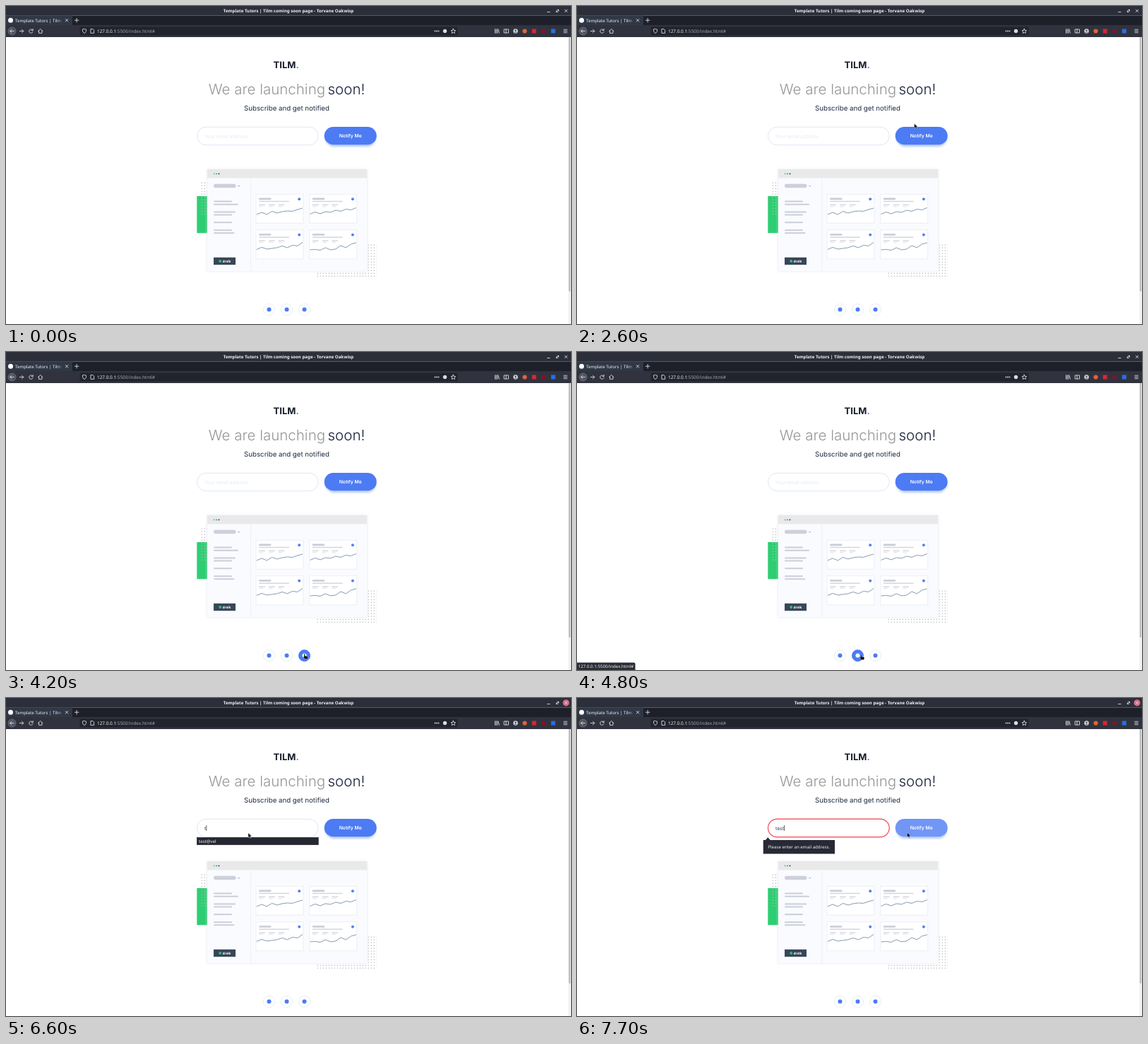
An HTML page for the animation above (8 s loop, 800 px wide and 450 px high).

```html
<!DOCTYPE html>
<html lang="en">
<head>
<meta charset="utf-8">
<title>Coming soon</title>
<style>
html, body { margin: 0; width: 100%; height: 100%; overflow: hidden; background: #fff; }
svg { display: block; width: 800px; height: 450px; }
text { text-rendering: geometricPrecision; white-space: pre; }
.ui { font-family: "Noto Sans", "DejaVu Sans", sans-serif; font-size: 6.14px; fill: #f0f1f4; }
.page { font-family: Inter, "Open Sans", sans-serif; fill: #1d2a41; }
.line { fill: none; stroke: #d9dbe0; stroke-width: .9; stroke-linecap: round; stroke-linejoin: round; }
</style>
</head>
<body>
<svg id="stage" viewBox="0 0 800 450" xmlns="http://www.w3.org/2000/svg">
  <defs>
    <filter id="glow" x="-20%" y="-40%" width="140%" height="200%"><feGaussianBlur stdDeviation="1.5"/></filter>
    <linearGradient id="fade" x1="72" x2="82" gradientUnits="userSpaceOnUse">
      <stop stop-color="#303846" stop-opacity="0"/><stop offset="1" stop-color="#303846"/>
    </linearGradient>
    <pattern id="dots" width="4" height="4" patternUnits="userSpaceOnUse">
      <circle cx="1.3" cy="2.2" r=".75" fill="#b9b9b9"/>
    </pattern>
  </defs>
  <rect width="800" height="450" fill="#fff"/>

  <g id="chrome">
    <rect width="800" height="13.5" fill="#2c2f3a"/>
    <rect y="13.5" width="800" height="13.5" fill="#1d1f29"/>
    <rect y="13.5" width="94" height="13.5" fill="#303846"/>
    <rect y="27" width="800" height="17" fill="#30333e"/>
    <rect x="104.500" y="29.500" width="535" height="12" rx="1.500" fill="#22242d"/>
    <text class="ui" x="400" y="8.800" text-anchor="middle" font-weight="700">Template Tutors | Tilm coming soon page - Torvane Oakwisp</text>
    <circle cx="6.500" cy="20.200" r="3.500" fill="#fff"/>
    <text class="ui" x="13" y="22.500">Template Tutors | Tilm</text>
    <rect x="72" y="15" width="11" height="11" fill="url(#fade)"/>
    <circle id="close" cx="793" cy="6.800" r="4.600" fill="#d96c83"/>
    <path class="line" d="M84.300 18.500l3.500 3.500m0-3.500l-3.500 3.500M97.300 20.200h5.600m-2.800-2.800v5.600M766.500 8.500h3.500M779.300 8.500l3.200-3.200m-1.800 0h1.800v1.800m-3.200-.4v1.800h1.800M791.300 5.100l3.400 3.400m0-3.400l-3.400 3.400"/>
    <circle cx="8.500" cy="35.500" r="5.500" fill="#50545f" stroke="#858993" stroke-width=".6"/>
    <path class="line" d="M11.200 35.500h-5.400m2.300-2.400l-2.400 2.400l2.400 2.400M19.300 35.500h5.500m-2.400-2.400l2.400 2.400l-2.400 2.400M37.600 34a2.700 2.700 0 1 0 .4 2.500M38.200 32.500v2h-2M45.500 35.500l3.200-3l3.200 3M46.500 35v3.400h4.400v-3.400"/>
    <path class="line" d="M111 32.500l2.600.8c0 3-.7 4.300-2.600 5.300c-1.900-1-2.600-2.300-2.600-5.300zM120.300 32.600h2.700l1.600 1.600v4.200h-4.300z"/>
    <text class="ui" x="129" y="37.800" style="font-size:6.400px">127.0.0.1<tspan fill="#a3a6ae">:5500/index.html#</tspan></text>
    <g fill="#d9dbe0"><circle cx="607.500" cy="35.500" r=".9"/><circle cx="610" cy="35.500" r=".9"/><circle cx="612.500" cy="35.500" r=".9"/></g>
    <circle cx="621.500" cy="35.500" r="2.700" fill="#d9dbe0"/>
    <path class="line" d="M633.300 32.200l1 2.200l2.300.2l-1.700 1.600l.5 2.400l-2.100-1.200l-2.100 1.200l.5-2.400l-1.700-1.600l2.300-.2z"/>
    <path class="line" d="M692.500 32.800v5.500m1.700-5.500v5.500m1.700-5.500v5.500m1-5.300l1.500 5.200M705.500 33h6v5h-6zm2.500 0v5M789.800 33.300h4.600m-4.600 2.200h4.600m-4.600 2.200h4.600"/>
    <circle cx="721.500" cy="35.500" r="3.200" fill="#d9dbe0"/>
    <circle cx="721.500" cy="34.700" r="1.100" fill="#30333e"/>
    <path d="M719.500 37.500q2-2 4 0" fill="#30333e"/>
    <circle cx="734.500" cy="35.500" r="3.100" fill="#e0643c"/>
    <rect x="744.700" y="32.500" width="6" height="6" fill="#d92632"/>
    <circle cx="761" cy="35.500" r="3" fill="#80142c"/>
    <rect x="771.800" y="32.500" width="6" height="6" fill="#286fe0"/>
    <rect x="796" y="44" width="4" height="406" fill="#f3f3f4"/>
    <rect x="796.800" y="44" width="2.400" height="360" rx="1.200" fill="#bdbec1"/>
  </g>

  <g class="page">
    <text x="378.600" y="87.700" font-size="13" font-weight="700" fill="#151b28">TILM<tspan fill="#4c7bf3">.</tspan></text>
    <text x="286.800" y="124.500" font-size="20.500" font-weight="300" fill="#969696">We are launching <tspan x="455.500" fill="#151f38">soon!</tspan></text>
    <text x="397.500" y="147.700" font-size="9.700" text-anchor="middle">Subscribe and get notified</text>
    <rect id="field" x="270.500" y="171.300" width="171.700" height="25.400" rx="12.700" fill="#fff"/>
    <text id="typed" x="281" y="186.500" font-size="6.800"></text>
    <rect id="caret" y="180" width=".7" height="8" fill="#222"/>
    <rect x="452" y="174" width="72" height="25" rx="12.500" fill="#4c7bf3" opacity=".4" filter="url(#glow)"/>
    <rect id="button" x="450.700" y="171" width="74" height="25.300" rx="12.650"/>
    <text x="487.700" y="186.200" font-size="6.800" font-weight="600" text-anchor="middle" style="fill:#fff">Notify Me</text>
  </g>

  <g id="art"></g>
  <g id="social"></g>

  <g id="status">
    <path d="M0 439.500h80.500q2 0 2 2v8.500H0z" fill="#2a2c36"/>
    <text class="ui" x="1.800" y="447">127.0.0.1:5500/index.html#</text>
  </g>
  <g id="popup">
    <rect x="270.300" y="197.300" width="172" height="10.500" fill="#252832" stroke="#171921" stroke-width=".5"/>
    <text class="ui" x="273" y="204.800">test@vel</text>
  </g>
  <g id="tip">
    <path d="M263.700 201h3.300l3.300-3.700l3.300 3.700h91.400v19.500h-101.300z" fill="#272a34"/>
    <text class="ui" x="270.300" y="212.800">Please enter an email address.</text>
  </g>

  <g id="cursor">
    <path id="arrow" d="M0 0v6.600l1.600-1.400l1 2.300l1.200-.5l-1-2.200l2.100-.2z" fill="#080808" stroke="#fff" stroke-width=".35"/>
    <path id="hand" d="M0 .6q.8-1.100 1.500 0v2.300l3.200.8q.8.300.7 1.200l-.6 2.700h-3.500l-2.700-3q.4-1 1.400 0z" fill="#080808" stroke="#fff" stroke-width=".35"/>
    <path id="beam" d="M-1.200-3.500h2.400M0-3.500v7M-1.200 3.500h2.400" fill="none" stroke="#222" stroke-width=".7"/>
  </g>
</svg>
<script>
const LOOP = 8000, STEP = 100, BLUE = '#4c7bf3';
const $ = id => document.getElementById(id);
const rect = (x, y, w, h, fill, extra = '') =>
  `<rect x="${x}" y="${y}" width="${w}" height="${h}" fill="${fill}" ${extra}/>`;
const dot = (x, y, r, fill) => `<circle cx="${x}" cy="${y}" r="${r}" fill="${fill}"/>`;

const trends = [
  [295, 292, 295, 290.5, 293, 291, 290, 290.5, 288, 286],
  [294.5, 291.5, 294, 291, 292, 289, 290.5, 287.5, 288.5, 285.5],
  [344.5, 341.5, 344, 343, 342, 339.5, 342, 338.5, 339.5, 334.5],
  [345, 344.5, 345.5, 342, 345, 344, 339, 342, 337, 335]
];

function card(i) {
  const x = i % 2 ? 429.7 : 354, y = i < 2 ? 266.2 : 316.8;
  const bar = (dx, dy, w, h, c) => rect(x + dx, y + dy, w, h, c, `rx="${h / 2}"`);
  const line = trends[i].map((v, k) => `${x + .8 + k * 7.25},${v}`).join(' ');
  let s = rect(x, y, 67, 41, '#fff', 'stroke="#e9ebf2" stroke-width=".8"');
  s += bar(4, 5.4, 17.5, 2.6, '#c9ccd8') + bar(4, 9.6, 43, 1.5, '#d3d6df');
  for (const dx of [4, 18, 31.5]) s += bar(dx, 14.6, 9, 1.3, '#ced1dc') + bar(dx, 17, 6, 1, '#dcdee6');
  s += dot(x + 61.2, y + 7, 2, '#5480f0');
  return s + `<polyline points="${line}" fill="none" stroke="#7188a5" stroke-width=".85"/>`;
}

function drawArt() {
  let s = rect(270.3, 269, 15, 52.3, '#2dce72');
  s += rect(276, 249, 9, 48, 'url(#dots)') + rect(440, 336, 85, 48, 'url(#dots)');
  s += rect(284.3, 230.8, 227.4, 144.8, '#dcdfe8', 'opacity=".6" filter="url(#glow)"');
  s += rect(285, 231, 226, 144, '#fafbfe') + rect(285, 231, 226, 12.5, '#e9e9e9');
  s += rect(346, 243.5, .8, 131.5, '#eceef5');
  ['#2dce72', '#2f9aa8', '#28336a'].forEach((c, i) => s += dot(294.7 + i * 3.4, 237.4, .95, c));
  s += rect(294, 251.8, 31.5, 5.4, '#cdd0db', 'rx="2.7"');
  s += `<path d="M328.3 254l1.400 1.400l1.400-1.400" fill="none" stroke="${BLUE}" stroke-width=".7"/>`;
  for (const [y, w] of [[275.5, 26], [279.7, 35], [290.5, 31], [294.6, 26], [305.3, 26], [316.2, 26], [320.3, 29.5]])
    s += rect(294, y, w, 2, '#cbced9', 'rx="1"');
  for (let i = 0; i < 4; i++) s += card(i);
  s += rect(294, 355.8, 31, 10.4, '#384657') + dot(303.2, 361, 1.9, '#36b98c');
  s += '<text class="page" x="306.6" y="362.700" font-size="4.800" font-weight="700" style="fill:#fff">drelk</text>';
  $('art').innerHTML = s;
}

function drawSocial() {
  $('social').innerHTML = [372.5, 397.5, 422.5].map(x =>
    `<g><circle cx="${x}" cy="429.600" r="8.100" stroke="#e1e7f6" stroke-width=".8"/><circle cx="${x}" cy="429.600" r="3"/></g>`).join('');
}

// time, x, y of the pointer
const path = [
  [1100, 623, 216], [1300, 609.5, 215.5], [1500, 609.5, 215.5], [1700, 607, 215.5],
  [1900, 607, 215.5], [2300, 548, 187], [2600, 477.5, 166.5], [2800, 486, 184],
  [3100, 486, 184], [3300, 517, 246], [3500, 558, 333.5], [3700, 589, 402],
  [3800, 570, 425], [4000, 455, 426], [4200, 422, 427], [4300, 422, 427],
  [4800, 401.5, 428], [5200, 373, 428], [5300, 371, 417], [5800, 337.5, 203],
  [6000, 343, 191], [6900, 343, 191], [7300, 505, 186], [7600, 467.5, 190.5], [8000, 467.5, 190.5]
];

function pointer(t) {
  const i = Math.max(1, path.findIndex(p => p[0] > t));
  const [t0, x0, y0] = path[i - 1], [t1, x1, y1] = path[i];
  const k = (t - t0) / (t1 - t0);
  return [x0 + (x1 - x0) * k, y0 + (y1 - y0) * k];
}

const show = (id, on) => $(id).setAttribute('visibility', on ? 'visible' : 'hidden');
const within = (t, a, b) => t >= a && t < b;
const level = (t, a, span) => Math.min(1, Math.max(0, (t - a + STEP) / span));

function typing(t) {
  const word = 'test'.slice(0, t < 6500 ? 0 : 1 + Math.floor(Math.max(0, t - 6600) / 100));
  const text = $('typed');
  text.textContent = word || 'Your email address';
  text.style.fill = word ? '#333b4c' : '#e3e9f9';
  $('caret').setAttribute('x', word ? 281.3 + text.getComputedTextLength() : 281);
  show('caret', t >= 6100);
}

function draw(now) {
  const t = Math.floor(now % LOOP / STEP) * STEP;
  const [x, y] = pointer(t);
  const seen = t >= 1100;
  const onLink = [372.5, 397.5, 422.5].findIndex(c => seen && Math.hypot(x + .5 - c, y + 1 - 429.6) < 8.6);
  const overButton = seen && x > 451 && x < 524 && y > 171 && y < 196;
  const beam = within(t, 5900, 6500);

  $('cursor').setAttribute('transform', `translate(${x} ${y})`);
  show('arrow', seen && onLink < 0 && !beam);
  show('hand', onLink >= 0);
  show('beam', beam);

  [...$('social').children].forEach((g, i) => {
    const on = i === onLink;
    g.children[0].setAttribute('fill', on ? BLUE : '#fff');
    g.children[0].setAttribute('stroke', on ? BLUE : '#e1e7f6');
    g.children[1].setAttribute('fill', on ? '#fff' : BLUE);
  });

  $('button').setAttribute('fill', overButton ? '#7196f6' : BLUE);
  const bad = t >= 7400;
  $('field').setAttribute('stroke', bad ? '#f4606b' : '#d8dff0');
  $('field').setAttribute('stroke-width', bad ? 1.4 : .8);
  typing(t);
  show('status', within(t, 4400, 5900));
  show('close', t >= 5900);
  show('popup', within(t, 6500, 7300));
  $('tip').setAttribute('opacity', level(t, 7400, 300));
}

drawArt();
drawSocial();
const start = performance.now();
function tick() {
  draw(performance.now() - start);
  requestAnimationFrame(tick);
}
tick();
</script>
</body>
</html>
```
